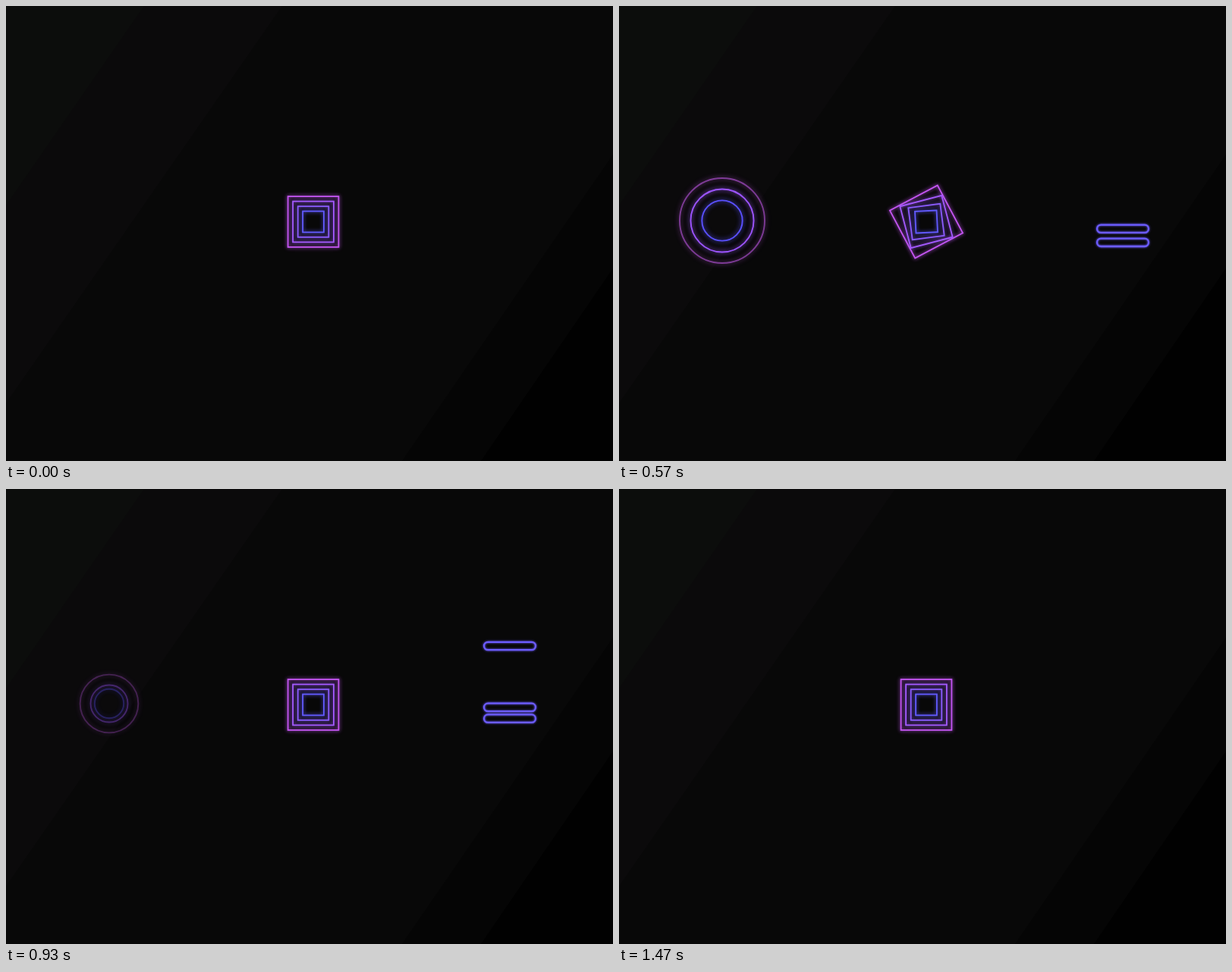
Animation of 800 by 600 pixels, one loop 1800 ms. Source, as an HTML page with a canvas:

```html
<!DOCTYPE html>
<html lang="en">
<head>
<meta charset="utf-8">
<title>Neon loops</title>
<style>
  html, body { margin: 0; height: 100%; overflow: hidden; background: #080808; }
  canvas { display: block; }
</style>
</head>
<body>
<canvas id="stage" width="800" height="600"></canvas>
<script>
const ctx = document.getElementById('stage').getContext('2d');
const LOOP = 1800, STEP = 30;

const clamp = v => Math.min(1, Math.max(0, v));
const progress = (t, start, length) => clamp((t - start) / length);

function polygon(color, ...points) {
  ctx.fillStyle = color;
  ctx.beginPath();
  points.forEach(([x, y]) => ctx.lineTo(x, y));
  ctx.fill();
}

function drawBackground() {
  ctx.fillStyle = '#080808';
  ctx.fillRect(0, 0, 800, 600);
  polygon('#0b0a0b', [0, 0], [364, 0], [0, 524]);
  polygon('#0c0d0c', [0, 0], [182, 0], [0, 263]);
  polygon('#050505', [800, 196], [800, 600], [522, 600]);
  polygon('#010101', [800, 346], [800, 600], [626, 600]);
}

function neon(color, width, blur, alpha = 1) {
  ctx.strokeStyle = ctx.shadowColor = color;
  ctx.lineWidth = width;
  ctx.shadowBlur = blur;
  ctx.globalAlpha = alpha;
}

// Each ring swells to its peak radius, then shrinks and fades.
const rings = [
  { color: '#5a50ff', radius: 27.2, peak: 445, bend: 3.4e-5, start: 120, fadeIn: 150, out: 710, alpha: 1 },
  { color: '#9c54ff', radius: 41.7, peak: 531, bend: 1.08e-4, start: 240, fadeIn: 120, out: 725, alpha: 1 },
  { color: '#c85cf0', radius: 56.2, peak: 604, bend: 1.68e-4, start: 270, fadeIn: 120, out: 770, alpha: 0.55 }
];

function drawRings(t) {
  for (const r of rings) {
    const alpha = r.alpha * progress(t, r.start, r.fadeIn) * (1 - progress(t, r.out, 310));
    const radius = r.radius - r.bend * (t - r.peak) ** 2;
    if (alpha <= 0 || radius <= 0) continue;
    neon(r.color, 1.9, 6, alpha);
    ctx.beginPath();
    ctx.arc(136, 283, radius, 0, 2 * Math.PI);
    ctx.stroke();
  }
}

// Nested squares make a quarter turn, the innermost first.
const squares = [
  { color: '#c455f2', half: 33.4, start: 215 },
  { color: '#a45aff', half: 26.9, start: 132 },
  { color: '#8c5cff', half: 20.3, start: 70 },
  { color: '#625aff', half: 13.9, start: 15 }
];

function drawSquares(t) {
  for (const s of squares) {
    const u = progress(t, s.start, 650);
    const turn = Math.sin(Math.PI / 2 * u ** 0.78) ** 2;
    const half = s.half * (1 + 0.065 * Math.sin(Math.PI * u));
    ctx.save();
    ctx.translate(405, 284.5);
    ctx.rotate(turn * Math.PI / 2);
    neon(s.color, 1.8, 5);
    ctx.strokeRect(-half, -half, 2 * half, 2 * half);
    ctx.restore();
  }
}

// Bars shoot in from below, drift through the middle and shoot out at the top.
function drawBars(t) {
  for (const start of [115, 370, 625]) {
    const u = (t - start) / 815;
    if (u < 0 || u > 1.02) continue;
    const p = Math.min(u, 1);
    const rise = 0.327 * (1 - (1 - p) ** 9.2) + 0.27 * p + 0.403 * p ** 70;
    neon('#6c5cff', 2.3, 3);
    ctx.beginPath();
    ctx.roundRect(630, 373 - 166 * rise - 5.2, 68, 10.4, 5.2);
    ctx.stroke();
  }
}

function frame() {
  const t = Math.floor(performance.now() % LOOP / STEP) * STEP;
  ctx.save();
  drawBackground();
  drawRings(t);
  drawSquares(t);
  drawBars(t);
  ctx.restore();
  requestAnimationFrame(frame);
}
frame();
</script>
</body>
</html>
```
